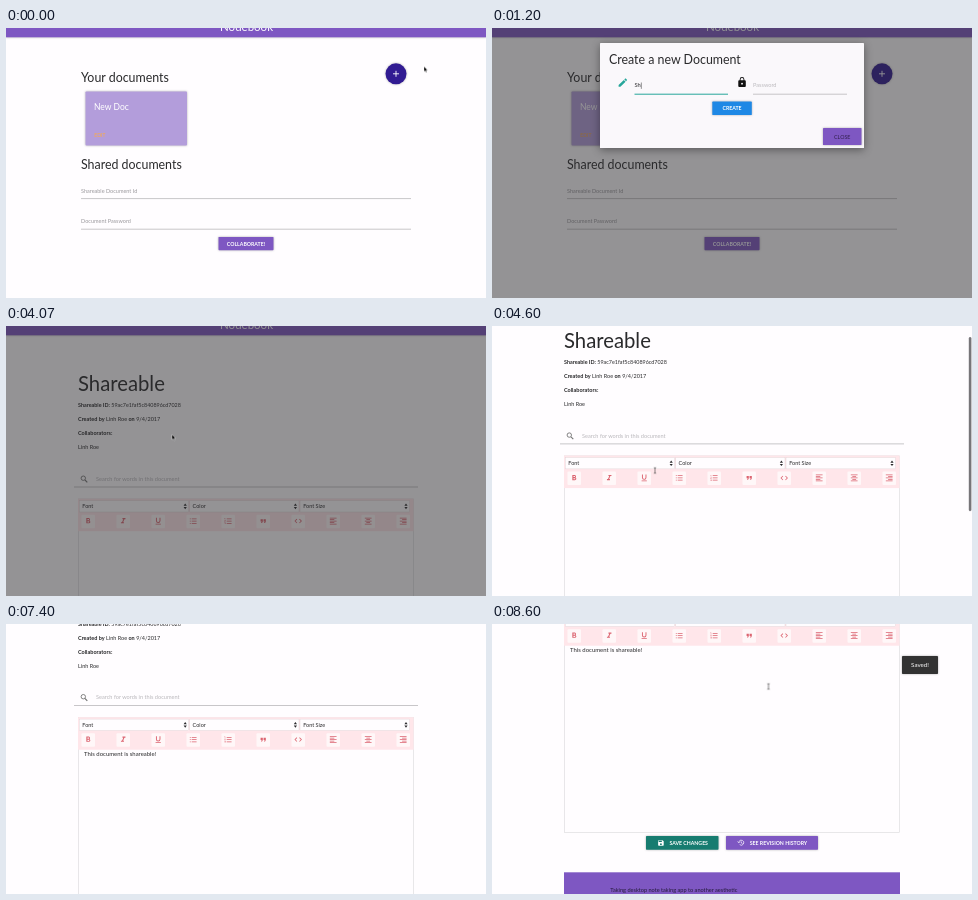
These frames come from a looping animation (480 by 270 pixels, 8.67 s). An HTML page:

```html
<!DOCTYPE html>
<html lang="en">
<head>
<meta charset="utf-8">
<title>Shared documents</title>
<style>
html, body { margin: 0; width: 100%; height: 100%; overflow: hidden; background: #fffdff; }
svg { display: block; width: 100vw; height: 100vh; font: 5.5px Lato, "Open Sans", sans-serif; fill: #2a2a2c; }
.h { font-size: 12.4px; }
.b { font-weight: 700; }
.btn { font-size: 5.2px; font-weight: 700; fill: #fff; text-anchor: middle; }
.mute { fill: #9a989c; }
.up { filter: drop-shadow(0 .7px .8px rgba(0,0,0,.3)); }
.line { stroke: #a3a1a5; stroke-width: .6; }

.a { animation: 8670ms linear infinite; }
.s { animation: 8670ms steps(1, end) infinite; }
#home { animation-name: home; }
#doc { animation-name: doc; }
#scroll { animation-name: scroll; }
#dim { animation-name: dim; }
#modal { animation-name: modal; transform-origin: 240px 67px; animation-timing-function: ease-out; }
#pen { animation-name: pen; }
#lock { animation-name: lock; }
#nameLine { animation-name: nameLine; }
#passLine { animation-name: passLine; }
#passHint { animation-name: passHint; }
#thumb { animation-name: thumb, thumbFade; }
#toast { animation-name: toast; }
#pointer { animation-name: move; animation-timing-function: ease-in-out; }
#arrow { animation-name: arrow; }
#hand { animation-name: hand; }
#beam { animation-name: beam; }

@keyframes home { 0% { opacity: 1 } 39.2%, 100% { opacity: 0 } }
@keyframes doc { 0% { opacity: 0 } 39.2%, 100% { opacity: 1 } }
@keyframes dim { 0%, 6.3% { opacity: 0 } 9.8%, 49.9% { opacity: .5 } 52.3%, 100% { opacity: 0 } }
@keyframes modal {
  0%, 6.3% { opacity: 0; transform: translateY(-12px) scale(.8) }
  9.8%, 36.9% { opacity: 1; transform: none }
  39.2%, 100% { opacity: 0; transform: translateY(-12px) scale(.8) }
}
@keyframes scroll {
  0%, 50.5% { transform: none }
  53.06% { transform: translateY(-43px); animation-timing-function: ease-out }
  57.2%, 85.5% { transform: translateY(-79.5px); animation-timing-function: ease-in-out }
  93%, 100% { transform: translateY(-183.5px) }
}
@keyframes thumb {
  0%, 50.5% { transform: translateY(-17px) }
  53.06% { transform: translateY(11px); animation-timing-function: ease-out }
  57.2%, 85.5% { transform: translateY(34px); animation-timing-function: ease-in-out }
  93%, 100% { transform: translateY(95px) }
}
@keyframes thumbFade {
  0%, 50.2% { opacity: 0 } 50.9%, 58.5% { opacity: 1 } 60.5%, 85.7% { opacity: 0 }
  86.4%, 95.5% { opacity: 1 } 97.5%, 100% { opacity: 0 }
}
@keyframes toast {
  0%, 93.8% { opacity: 0; transform: translateY(12px) }
  97.2%, 100% { opacity: 1; transform: none }
}
@keyframes pen { 0% { fill: #111 } 11.3% { fill: #26a69a } 24.6%, 100% { fill: #111 } }
@keyframes lock { 0% { fill: #111 } 24.6%, 100% { fill: #26a69a } }
@keyframes nameLine { 0% { stroke: #a3a1a5 } 11.3% { stroke: #26a69a } 24.6%, 100% { stroke: #4caf50 } }
@keyframes passLine {
  0% { stroke: #a3a1a5; stroke-width: .6 } 24.6%, 100% { stroke: #26a69a; stroke-width: 1 }
}
@keyframes passHint { 0% { opacity: 1 } 27.7%, 100% { opacity: 0 } }
@keyframes move {
  0%, .8% { transform: translate(418px, 38.5px) }
  5%, 6.5% { transform: translate(390px, 46px) }
  10.5% { transform: translate(165px, 58px) }
  32.3% { transform: translate(215px, 66px) }
  35%, 38% { transform: translate(254.5px, 78px) }
  46.7%, 49.9% { transform: translate(166px, 108.5px) }
  52.8%, 61% { transform: translate(163px, 144.5px) }
  86% { transform: translate(190px, 150px) }
  91.5%, 94% { transform: translate(190px, 218px) }
  99%, 100% { transform: translate(276.5px, 62.5px) }
}
@keyframes arrow {
  0% { opacity: 1 } 4.5% { opacity: 0 } 7% { opacity: 1 } 11% { opacity: 0 }
  32.3% { opacity: 1 } 34.9% { opacity: 0 } 38% { opacity: 1 } 52%, 100% { opacity: 0 }
}
@keyframes hand {
  0% { opacity: 0 } 4.5% { opacity: 1 } 7% { opacity: 0 } 34.9% { opacity: 1 }
  38% { opacity: 0 } 91% { opacity: 1 } 96%, 100% { opacity: 0 }
}
@keyframes beam {
  0% { opacity: 0 } 52% { opacity: 1 } 60.8% { opacity: 0 }
  86% { opacity: 1 } 91% { opacity: 0 } 96%, 100% { opacity: 1 }
}
</style>
</head>
<body>
<svg viewBox="0 0 480 270" preserveAspectRatio="none">
  <defs>
    <g id="bar">
      <rect width="480" height="9.3" fill="#7e57c2" class="up"/>
      <text x="240.5" y="2.8" font-size="11.5" fill="#fff" text-anchor="middle">Nodebook</text>
    </g>
    <path id="updown" d="M-1.6-.6L0-2.8 1.6-.6zM-1.6.6L0 2.8 1.6.6z"/>
  </defs>
  <rect width="480" height="270" fill="#fffdff"/>

  <g id="home" class="s">
    <use href="#bar"/>
    <text class="h" x="75" y="53.5">Your documents</text>
    <g class="up"><circle cx="390" cy="45.8" r="10.5" fill="#311b92"/></g>
    <path d="M387 45.8h6M390 42.8v6" stroke="#fff" stroke-width=".9"/>
    <rect class="up" x="79.5" y="63.5" width="101.5" height="54" rx=".8" fill="#b39ddb"/>
    <text x="88" y="82" font-size="8.5" fill="#fff">New Doc</text>
    <text x="88.3" y="108.8" font-size="5" fill="#ffab40">EDIT</text>
    <text class="h" x="75" y="141">Shared documents</text>
    <text class="mute" x="75" y="164.8">Shareable Document Id</text>
    <path class="line" d="M75 170.6H405M75 201.2H405"/>
    <text class="mute" x="75" y="195">Document Password</text>
    <rect class="up" x="212.5" y="209" width="55" height="13.2" rx=".6" fill="#7e57c2"/>
    <text class="btn" x="240" y="217.6">COLLABORATE!</text>
  </g>

  <g id="doc" class="s">
    <g id="scroll" class="a">
      <use href="#bar"/>
      <text x="72" y="65" font-size="20.3">Shareable</text>
      <text x="72" y="81.4" font-size="5.4"><tspan class="b">Shareable ID:</tspan> 59ac7e1faf5c840896cd7028</text>
      <text x="72" y="95.4"><tspan class="b">Created by</tspan> Linh Roe <tspan class="b">on</tspan> 9/4/2017</text>
      <text class="b" x="72" y="109.2">Collaborators:</text>
      <text x="72" y="123.2">Linh Roe</text>
      <path d="M79 154l2.3 2.3" stroke="#757575" stroke-width="1.1"/>
      <circle cx="77.3" cy="152.2" r="2.2" fill="none" stroke="#757575" stroke-width=".9"/>
      <text x="90" y="154.9" font-size="5.6" fill="#b9b7bb">Search for words in this document</text>
      <path class="line" d="M68 161H412"/>
      <rect x="72.3" y="173" width="335" height="219" fill="#fffdff" stroke="#d9d7da" stroke-width=".6"/>
      <rect x="72" y="172.7" width="335.6" height="32.5" fill="#ffe6ea"/>
      <g fill="#fffdff" stroke="#ddcfd3" stroke-width=".4">
        <rect x="73.2" y="174.6" width="109.6" height="11.4"/>
        <rect x="183.8" y="174.6" width="109.2" height="11.4"/>
        <rect x="294" y="174.6" width="109.6" height="11.4"/>
      </g>
      <text x="76.3" y="182.4">Font</text>
      <text x="186.6" y="182.4">Color</text>
      <text x="297.2" y="182.4">Font Size</text>
      <use href="#updown" x="179.2" y="180.4"/>
      <use href="#updown" x="289.4" y="180.4"/>
      <use href="#updown" x="400" y="180.4"/>
      <g id="tools" fill="#dc6470"></g>
      <text id="body" x="78" y="211.8" font-size="5.95"></text>
      <rect class="up" x="154" y="395.6" width="72.5" height="13.6" rx=".6" fill="#177c70"/>
      <path transform="translate(165.2 398.7) scale(.31)" fill="#fff" d="M17 3H5a2 2 0 0 0-2 2v14a2 2 0 0 0 2 2h14a2 2 0 0 0 2-2V7zm-5 16a3 3 0 1 1 0-6 3 3 0 0 1 0 6zm3-10H5V5h10z"/>
      <text class="btn" x="196.7" y="404.3">SAVE CHANGES</text>
      <rect class="up" x="234" y="395.6" width="92" height="13.6" rx=".6" fill="#7e57c2"/>
      <path d="M246.9 401.4a2.5 2.5 0 1 1 .8 2.7M245.6 401l1.2 1.4 1.3-1.3M249.3 401v1.5l1.2.7" fill="none" stroke="#fff" stroke-width=".7"/>
      <text class="btn" x="286.5" y="404.3">SEE REVISION HISTORY</text>
      <rect x="72" y="431.8" width="336" height="60" fill="#7e57c2"/>
      <text x="118.3" y="451.6" font-size="5.6" fill="#241a3a">Taking desktop note taking app to another aesthetic</text>
    </g>
    <rect id="thumb" class="a" x="476.8" width="2.6" height="174" rx="1.3" fill="#777579"/>
    <g id="toast" class="a">
      <rect class="up" x="410" y="32" width="36" height="18" rx=".7" fill="#323232"/>
      <text x="428" y="43.2" font-size="6.2" fill="#fff" text-anchor="middle">Saved!</text>
    </g>
  </g>

  <rect id="dim" class="a" width="480" height="270"/>

  <g id="modal" class="a">
    <rect x="108" y="15" width="264" height="105" rx=".6" fill="#faf8fb" style="filter:drop-shadow(0 2px 4px rgba(0,0,0,.4))"/>
    <text class="h" x="117" y="36">Create a new Document</text>
    <path id="pen" class="s" transform="translate(125.2 49) scale(.47)" d="M3 17.25V21h3.75L17.81 9.94l-3.75-3.75zM20.71 7.04a1 1 0 0 0 0-1.41l-2.34-2.34a1 1 0 0 0-1.41 0l-1.83 1.83 3.75 3.75z"/>
    <path id="lock" class="s" transform="translate(244.4 48.6) scale(.47)" d="M18 8h-1V6A5 5 0 0 0 7 6v2H6a2 2 0 0 0-2 2v10a2 2 0 0 0 2 2h12a2 2 0 0 0 2-2V10a2 2 0 0 0-2-2zm-6 9a2 2 0 1 1 0-4 2 2 0 0 1 0 4zm3.1-9H8.9V6a3.1 3.1 0 0 1 6.2 0z"/>
    <path id="nameLine" class="s" d="M142.5 66.2H236"/>
    <path id="passLine" class="s" d="M261 66.2H355"/>
    <text id="name" x="142.5" y="59.4" font-size="5.75"></text>
    <text id="passHint" class="s" x="261" y="59.4" font-size="5.6" fill="#bbb9bd">Password</text>
    <text id="pass" class="b" x="261" y="59.2" font-size="4.6"></text>
    <rect class="up" x="220.3" y="73.6" width="39.5" height="13.4" rx=".6" fill="#1e88e5"/>
    <text class="btn" x="240" y="82.2">CREATE</text>
    <rect class="up" x="331" y="100" width="38.5" height="17" rx=".6" fill="#7e57c2"/>
    <text x="350.2" y="110.5" font-size="5.3" fill="#33204f" text-anchor="middle">CLOSE</text>
  </g>

  <g id="pointer" class="a" stroke-linejoin="round">
    <path id="arrow" class="s" d="M0 0v5.2l1.2-1.1.8 1.9.9-.4-.8-1.8h1.6z" fill="#000" stroke="#fff" stroke-width=".4"/>
    <path id="hand" class="s" d="M-.6-.4q.6-.6 1.1 0v1.9l2.3.5q.5.2.4.8l-.5 2.4H-.3L-2 3q0-.7.8-.4l.6.5z" fill="#fff" stroke="#222" stroke-width=".4"/>
    <path id="beam" class="s" d="M-1.2-2.8Q0-2.8 0-2 0-2.8 1.2-2.8M0-2V2M-1.2 2.8Q0 2.8 0 2 0 2.8 1.2 2.8" fill="none" stroke="#333" stroke-width=".6"/>
  </g>
</svg>
<script>
const T = 8670;
const $ = id => document.getElementById(id);
const loop = { duration: T, iterations: Infinity };
const hold = 'steps(1, end)';

function make(tag, parent, attrs) {
  const el = document.createElementNS('http://www.w3.org/2000/svg', tag);
  for (const k in attrs) el.setAttribute(k, attrs[k]);
  return parent.appendChild(el);
}

const bars = 'M8 5h13v2H8zM8 11h13v2H8zM8 17h13v2H8z';
const icons = [
  'M15.6 10.79A4 4 0 0 0 14 4H7v14h7.04a3.8 3.8 0 0 0 1.56-7.21zM10 6.5h3a1.5 1.5 0 0 1 0 3h-3zm3.5 9H10v-3h3.5a1.5 1.5 0 0 1 0 3z',
  'M10 4v3h2.21l-3.42 8H6v3h8v-3h-2.21l3.42-8H18V4z',
  'M12 17a6 6 0 0 0 6-6V3h-2.5v8a3.5 3.5 0 0 1-7 0V3H6v8a6 6 0 0 0 6 6zm-7 2v2h14v-2z',
  bars + 'M3 5h2.5v2H3zM3 11h2.5v2H3zM3 17h2.5v2H3z',
  bars + 'M2 4h2v4H3V5H2zM2 10h3v1l-1.8 2H5v1H2v-1l1.8-2H2zM2 16h3v4H2v-1h2v-2H2z',
  'M6 17h3l2-4V7H5v6h3zm8 0h3l2-4V7h-6v6h3z',
  'M9.4 16.6L4.8 12l4.6-4.6L8 6l-6 6 6 6zm5.2 0l4.6-4.6-4.6-4.6L16 6l6 6-6 6z',
  'M15 15H3v2h12zm0-8H3v2h12zM3 13h18v-2H3zm0 8h18v-2H3zM3 3v2h18V3z',
  'M7 15v2h10v-2zm-4 6h18v-2H3zm0-8h18v-2H3zm4-6v2h10V7zM3 3v2h18V3z',
  'M3 21h18v-2H3zm6-4h12v-2H9zm-6-4h18v-2H3zm6-4h12V7H9zM3 3v2h18V3z'
];
icons.forEach((d, i) => {
  const x = 82 + i * 35;
  make('rect', $('tools'), { x: x - 6.5, y: 188.7, width: 13.5, height: 13.5, rx: 1, fill: '#fff7f8' });
  make('path', $('tools'), { d, transform: `translate(${x - 4.3} 190.6) scale(.375)` });
});

// Reveals text letter by letter, with a caret behind the last one.
function type(id, text, start, step, end) {
  const box = $(id);
  const at = i => (start + i * step) / T;
  [...text].forEach((c, i) => {
    const span = make('tspan', box, {});
    span.textContent = c;
    span.animate([
      { fillOpacity: 0, easing: hold },
      { fillOpacity: 1, offset: at(i) },
      { fillOpacity: 1 }
    ], loop);
  });
  const size = parseFloat(box.getAttribute('font-size'));
  const caret = make('rect', box.parentNode, {
    x: .3, y: box.getAttribute('y') - size * .85, width: .5, height: size * 1.1
  });
  const show = (x, offset) => ({ opacity: 1, transform: `translateX(${x}px)`, offset, easing: hold });
  caret.animate([
    { opacity: 0, easing: hold },
    show(+box.getAttribute('x'), at(-1)),
    ...[...text].map((c, i) => show(box.getEndPositionOfChar(i).x, at(i))),
    { opacity: 0, offset: end / T, easing: hold },
    { opacity: 0 }
  ], loop);
}
type('name', 'Shareable', 1070, 90, 2130);
type('pass', '•••', 2400, 110, 2800);
type('body', 'This document is shareable!', 5270, 69, 7130);
</script>
</body>
</html>
```
